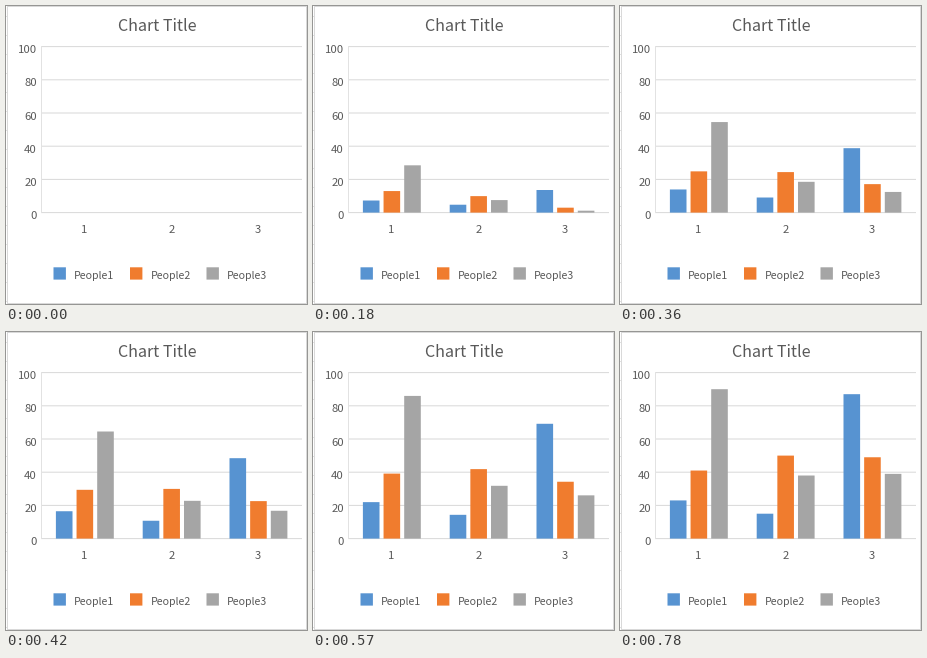
These frames come from a looping animation (301 px wide and 298 px high, 1860 ms). A matplotlib script:

```python
import numpy as np
import matplotlib.pyplot as plt
from matplotlib.animation import FuncAnimation
from matplotlib.patches import Rectangle

W, H, DPI = 301, 298, 64
STEP, LOOP = 30, 1860

BLUE, ORANGE, GRAY = "#5793d1", "#f07c2e", "#a5a5a5"
GRID, INK = "#d9d9d9", "#595959"

ZERO_Y, UNIT = 206.6, 1.66          # baseline and pixels per value
BAR_W, PITCH, GROUP = 16.6, 20.65, 86.8

SERIES = [
    ("People1", BLUE, (23, 15, 87), (0, 0, 0.16)),
    ("People2", ORANGE, (41, 50, 49), (0, 0.118, 0.256)),
    ("People3", GRAY, (90, 38, 39), (0, 0.118, 0.287)),
]

# shared clock: nearly linear, with a short stall at 300 ms
CLOCK_T = (60, 120, 240, 270, 300, 360, 510, 570, 600, 660, 780)
CLOCK_P = (0.083, 0.2, 0.433, 0.491, 0.491, 0.606, 0.883, 0.955,
           1.015, 1.135, 1.29)

plt.rcParams["font.family"] = "Noto Sans CJK JP"

fig = plt.figure(figsize=(W / DPI, H / DPI), dpi=DPI, facecolor="white")
ax = fig.add_axes([0, 0, 1, 1])
ax.set_xlim(0, W)
ax.set_ylim(H, 0)
ax.axis("off")


def box(x, y, w, h, color, z=1):
    return ax.add_patch(Rectangle((x, y), w, h, fc=color, lw=0, zorder=z,
                                  snap=False))


def label(x, y, text, px=11.3, ha="center"):
    ax.text(x, y, text, size=px * 72 / DPI, color=INK, ha=ha, va="baseline")


# sheet rows peeking out beside the chart, then the chart border
for y in np.arange(10, H, 19):
    box(0, y, 2, 1, "#e1e1e1")
box(1, 0, 300, 1, GRID)
box(1, 297, 300, 1, GRID)
box(1, 0, 1, H, GRID)
box(300, 0, 1, H, GRID)

label(151, 25, "Chart Title", 16.1)
for value in range(0, 101, 20):
    y = ZERO_Y - value * UNIT - 0.5
    box(35, y, 261, 1, GRID)
    label(30.8, y + 7, str(value), ha="right")
box(35, 40, 1, 167, "#e2e2e2")
for g in range(3):
    label(78.5 + g * GROUP, 227, str(g + 1))

bars = []
for s, (name, color, values, delays) in enumerate(SERIES):
    left = 47.5 + s * 76.5
    box(left, 261.3, 12.4, 12.3, color)
    label(left + 20.5, 273.3, name, 10.6, "left")
    for g, (value, delay) in enumerate(zip(values, delays)):
        x = 49.9 + g * GROUP + s * PITCH
        bars.append((box(x, ZERO_Y, BAR_W, 0, color, 3), value, delay))


def clock(t):
    return 0 if t < CLOCK_T[0] else np.interp(t, CLOCK_T, CLOCK_P)


def update(i):
    p = clock(i * STEP)
    for bar, value, delay in bars:
        bar.set_height(-value * UNIT * np.clip(p - delay, 0, 1))
    return [bar for bar, _, _ in bars]


anim = FuncAnimation(fig, update, frames=LOOP // STEP, interval=STEP,
                     repeat=True, repeat_delay=0, blit=False)
plt.show()
```
